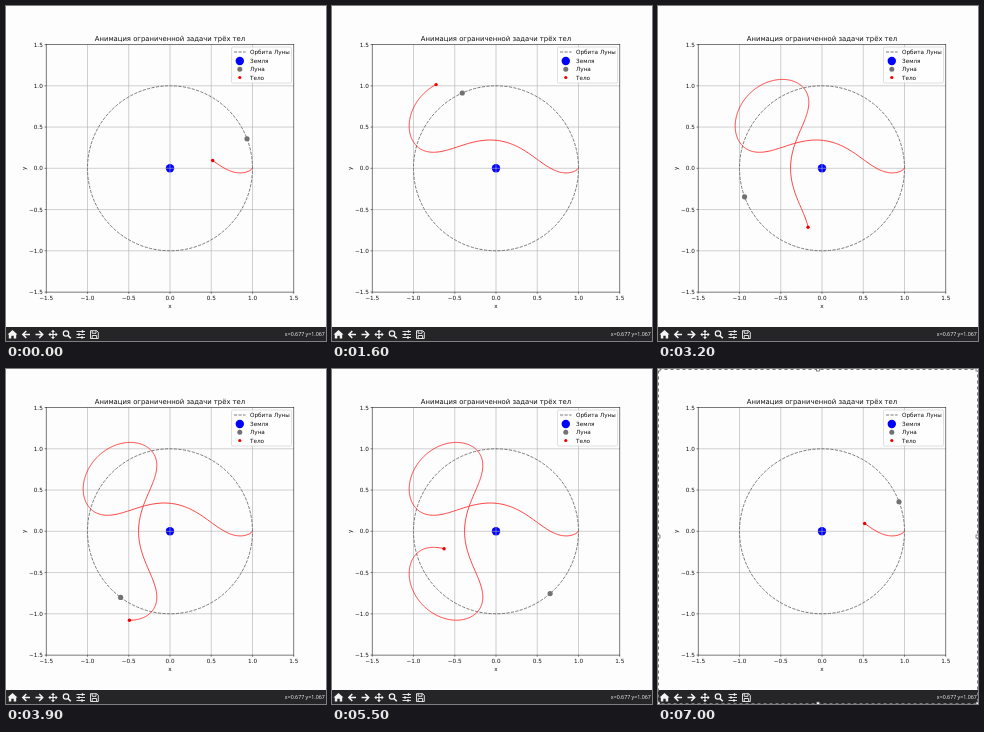
Animation of 320 by 335 pixels, one loop 7.1 s. Source, as an HTML page:

```html
<!DOCTYPE html>
<html lang="ru">
<head>
<meta charset="utf-8">
<title>Анимация ограниченной задачи трёх тел</title>
<style>
html, body { margin: 0; width: 100%; height: 100%; overflow: hidden; background: #fdfdfd; }
svg { display: block; width: 320px; height: 335px; }
text { font: 5.7px "DejaVu Sans", sans-serif; fill: #111; }
.title { font-size: 6.85px; }
.coords { font: 5.3px "Open Sans", sans-serif; fill: #f4f4f4; }
.grid { stroke: #b0b0b0; stroke-width: .6; }
.axis { fill: none; stroke: #222; stroke-width: .6; }
.orbit { fill: none; stroke: #666; stroke-width: .86; stroke-dasharray: 3.16 1.37; }
.trail { fill: none; stroke: #f22; stroke-width: .85; stroke-linejoin: round; }
.earth { fill: #00f; }
.moon { fill: #727272; }
.body { fill: #e00; }
.icons { fill: none; stroke: #f4f4f4; stroke-width: 1.2; }
.icons .solid { fill: #f4f4f4; stroke: none; }
.dashes { fill: none; stroke: #777; stroke-dasharray: 3 3; }
.handle { fill: #fff; stroke: #555; stroke-width: .7; }
</style>
</head>
<body>
<svg viewBox="0 0 320 335">
  <rect width="320" height="335" fill="#fdfdfd"/>
  <circle class="earth" cx="164" cy="162.3" r="4.2"/>
  <g id="axes"></g>
  <path class="orbit" d="M246.5 162.3A82.5 82.5 0 0 0 81.5 162.3A82.5 82.5 0 0 0 246.5 162.3"/>
  <path class="trail" id="trail"/>
  <circle class="moon" id="moon" r="2.6"/>
  <circle class="body" id="body" r="1.7"/>
  <rect class="axis" x="40.2" y="38.5" width="247.6" height="247.6"/>
  <text class="title" x="164" y="35.2" text-anchor="middle">Анимация ограниченной задачи трёх тел</text>
  <text x="164" y="302" text-anchor="middle">x</text>
  <text transform="translate(19.5 162.3) rotate(-90)" text-anchor="middle">y</text>

  <rect x="225.5" y="41" width="60" height="36" rx="1.2" fill="#fff" fill-opacity=".8" stroke="#ccc" stroke-width=".6"/>
  <path class="orbit" d="M228 46h11.6"/>
  <circle class="earth" cx="233.8" cy="55" r="4.2"/>
  <circle class="moon" cx="233.8" cy="63.2" r="2.5"/>
  <circle class="body" cx="233.8" cy="71.5" r="1.6"/>
  <text x="244" y="48">Орбита Луны</text>
  <text x="244" y="56.7">Земля</text>
  <text x="244" y="65.2">Луна</text>
  <text x="244" y="73.5">Тело</text>

  <rect y="321" width="320" height="14" fill="#252527"/>
  <g class="icons">
    <path class="solid" d="M6.5 324l5 4.5h-1.3v4h-2.5v-2.7h-2.4v2.7h-2.5v-4h-1.3z"/>
    <path d="M24 328.5h-7M20.3 325l-3.5 3.5 3.5 3.5M29.5 328.5h7M33.2 325l3.5 3.5-3.5 3.5" stroke-width="1.5"/>
    <path d="M43.5 328.5h7M47 325v7"/>
    <path class="solid" d="M47 323.8l1.9 2.2h-3.8zM47 333.2l1.9-2.2h-3.8zM42.3 328.5l2.2-1.9v3.8zM51.7 328.5l-2.2-1.9v3.8z"/>
    <circle cx="60" cy="327.5" r="2.7"/>
    <path d="M62 329.5l2.8 2.8" stroke-width="1.6"/>
    <path d="M70.5 325.5h8.5M70.5 328.5h8.5M70.5 331.5h8.5" stroke-width=".9"/>
    <path d="M76.5 324.3v2.4M73 327.3v2.4M76 330.3v2.4" stroke-width="1.4"/>
    <path d="M84.5 324.7h6.2l1.6 1.6v6.2h-7.8zM86.2 324.7v2.6h3.8v-2.6M86.2 332.3v-2.8h4.4v2.8" stroke-width=".9"/>
  </g>
  <text class="coords" x="318.8" y="330.4" text-anchor="end">x=0.677 y=1.067</text>
  <g id="frame"><rect class="dashes" x=".5" y=".5" width="319" height="334"/></g>
</svg>
<script>
const $ = id => document.getElementById(id);
const px = x => 164 + 82.5 * x;
const py = y => 162.3 - 82.5 * y;

function add(parent, tag, attrs, text = '') {
  const el = document.createElementNS('http://www.w3.org/2000/svg', tag);
  for (const k in attrs) el.setAttribute(k, attrs[k]);
  el.textContent = text;
  parent.append(el);
}

for (let v = -1.5; v <= 1.5; v += 0.5) {
  const label = v.toFixed(1).replace('-', '\u2212');
  const x = px(v), y = py(v);
  if (Math.abs(v) < 1.5) add($('axes'), 'path', { class: 'grid', d: `M${x} 38.5V286.1M40.2 ${y}H287.8` });
  add($('axes'), 'path', { class: 'axis', d: `M${x} 286.1v1.6M40.2 ${y}h-1.6` });
  add($('axes'), 'text', { x, y: 294.4, 'text-anchor': 'middle' }, label);
  add($('axes'), 'text', { x: 36.8, y: y + 2.1, 'text-anchor': 'end' }, label);
}

for (const x of [0.5, 160, 319.5])
  for (const y of [0.5, 167.5, 334.5])
    if (x !== 160 || y !== 167.5) add($('frame'), 'rect', { class: 'handle', x: x - 1.5, y: y - 1.5, width: 3, height: 3 });

// Arenstorf orbit in the rotating frame; the second half mirrors the first.
const MU = 0.012277471, NU = 1 - MU;
const PERIOD = 11.124340337266085;
const N = 720;

function deriv([x, y, u, v]) {
  const a = NU / Math.hypot(x + MU, y) ** 3;
  const b = MU / Math.hypot(x - NU, y) ** 3;
  return [u, v, x + 2 * v - a * (x + MU) - b * (x - NU), y - 2 * u - (a + b) * y];
}

function rk4(s, h) {
  const move = (k, c) => s.map((q, i) => q + c * k[i]);
  const k1 = deriv(s), k2 = deriv(move(k1, h / 2));
  const k3 = deriv(move(k2, h / 2)), k4 = deriv(move(k3, h));
  return s.map((q, i) => q + h / 6 * (k1[i] + 2 * k2[i] + 2 * k3[i] + k4[i]));
}

function solve() {
  const pts = [];
  let s = [0.994, 0, 0, -2.0317326295573368];
  for (let i = 0; i <= N / 2; i++) {
    pts[i] = [s[0], s[1]];
    pts[N - i] = [s[0], -s[1]];
    for (let left = PERIOD / N; left > 1e-12;) {
      const r = Math.min(1, Math.hypot(s[0] + MU, s[1]), Math.hypot(s[0] - NU, s[1]));
      const h = Math.min(left, 0.03 * r ** 1.5);
      s = rk4(s, h);
      left -= h;
    }
  }
  return pts;
}

const orbit = solve();
const pace = [[0, 21], [1000, 79.6], [2200, 148.7], [3200, 200.2], [4600, 266.3], [5500, 311], [6600, 360], [7000, 381]];

function angleAt(t) {
  const i = Math.max(1, pace.findIndex(p => p[0] >= t));
  const [t0, a0] = pace[i - 1], [t1, a1] = pace[i];
  return (a0 + (a1 - a0) * (t - t0) / (t1 - t0)) % 360;
}

function place(id, x, y) {
  $(id).setAttribute('cx', px(x));
  $(id).setAttribute('cy', py(y));
}

function draw(t) {
  const deg = angleAt(t), rad = deg * Math.PI / 180;
  const pos = deg / 360 * N, i = Math.floor(pos), f = pos - i;
  const [p, q] = [orbit[i], orbit[i + 1]];
  const tip = [p[0] + (q[0] - p[0]) * f, p[1] + (q[1] - p[1]) * f];
  const path = [...orbit.slice(0, i + 1), tip];
  $('trail').setAttribute('d', 'M' + path.map(([x, y]) => px(x).toFixed(2) + ' ' + py(y).toFixed(2)).join('L'));
  place('moon', Math.cos(rad), Math.sin(rad));
  place('body', ...tip);
  $('frame').style.display = t >= 6000 ? '' : 'none';
}

const STEP = 100, LOOP = 7100;
const start = performance.now();
let last = -1;
function tick() {
  const t = Math.floor((performance.now() - start) % LOOP / STEP) * STEP;
  if (t !== last) draw(last = t);
  requestAnimationFrame(tick);
}
tick();
</script>
</body>
</html>
```
